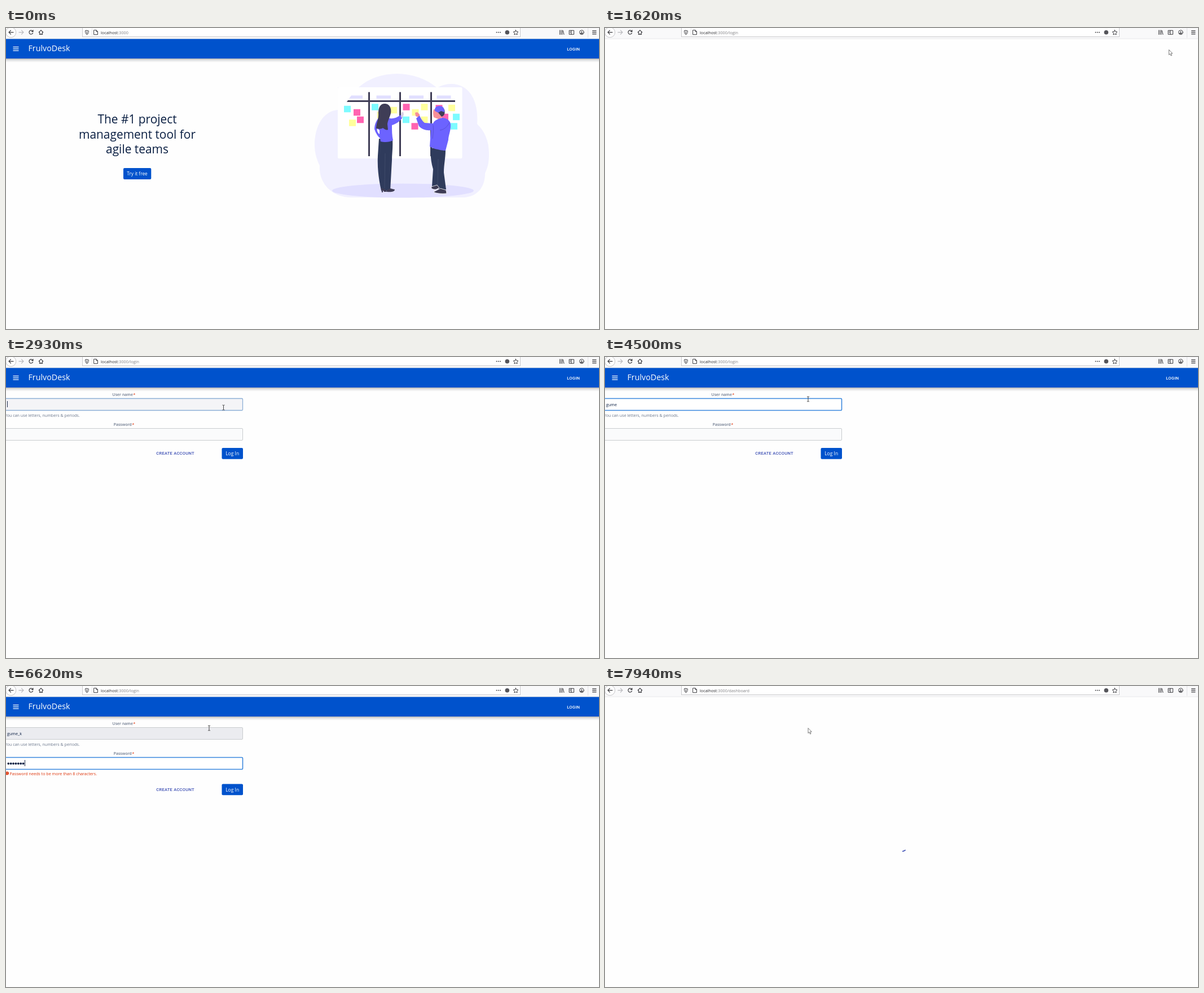
These frames come from a looping animation (1051 px wide and 533 px high, 8000 ms). An HTML page:

```html
<!DOCTYPE html>
<html lang="en">
<head>
<meta charset="utf-8">
<title>Project board login</title>
<style>
  html, body { margin: 0; width: 100%; height: 100%; overflow: hidden; background: #fefefe; }
  svg { display: block; width: 1051px; height: 533px; }
  text { font-family: "Open Sans", "Noto Sans", sans-serif; font-size: 7.17px; white-space: pre; }
  .mid { text-anchor: middle; }
  .headline text { font-size: 20.9px; fill: #091e42; }
  .caps { font-family: Roboto, sans-serif; font-weight: 500; font-size: 7.6px; letter-spacing: .22px; }
  .label { font-weight: 600; font-size: 6.95px; fill: #6b778c; }
  .label tspan { font-weight: 400; fill: #de350b; }
  .icons { fill: none; stroke: #3b3b3f; stroke-width: 1.2; stroke-linecap: round; stroke-linejoin: round; }
  .notes { stroke-width: 11.5; fill: none; }
  .dark { fill: #3f3d56; }
  .navy { fill: #2f3b5c; }
  .purple { fill: #6c63ff; }
  .pale { fill: #e1dfff; }
  .skin { fill: #f78f98; }
</style>
</head>
<body>
<svg viewBox="0 0 1051 533">
  <defs>
    <linearGradient id="shade" x2="0" y2="1">
      <stop stop-color="#000" stop-opacity=".3"/>
      <stop offset=".4" stop-color="#000" stop-opacity=".11"/>
      <stop offset="1" stop-color="#000" stop-opacity="0"/>
    </linearGradient>
  </defs>
  <rect width="1051" height="533" fill="#fefefe"/>

  <g id="home">
    <g class="mid headline">
      <text x="232.5" y="169">The #1 project</text>
      <text x="232.5" y="195.5">management tool for</text>
      <text x="232.5" y="222">agile teams</text>
    </g>
    <rect x="208" y="248" width="49.3" height="20" rx="2" fill="#0052cc"/>
    <text class="mid" x="232.5" y="261.3" fill="#fff" style="font-size:8.35px">Try it free</text>

    <path fill="#f1f0ff" d="M588 145C563 147 547 173 547 207C547 222 551 233 556 244C554 277 580 300 612 300H812C836 298 849 282 849 257C855 245 856 235 856 222C856 200 848 182 835 170C838 130 822 99 789 99C779 99 771 102 764 106C745 90 720 81 693 81C667 81 643 89 625 105H588Z"/>
    <ellipse class="pale" cx="703.5" cy="288" rx="125.5" ry="12.6"/>
    <rect x="588" y="105" width="220.5" height="126" rx="2" fill="#fff"/>
    <path class="pale" d="M612 119.5H632V125H608ZM656.5 119.5h25.5v5.5h-25.5zM714.5 119.5h25.5v5.5h-25.5zM763.5 119.5h25v5.5h-25z"/>
    <path class="dark" d="M606 128H796V131H604ZM642 113.5h3v113.5h-3zM697 113.5h3v113.5h-3zM752 113.5h3v113.5h-3z"/>
    <g class="notes">
      <path stroke="#7dfbff" d="M599 143.5h12M648 140h12M703 162.5h12M792 157.5h12M788 174h12"/>
      <path stroke="#ff63b1" d="M616 149.5h12M622 162.5h12M703.5 140h12M718.5 174h12M761.5 142h12M772 157.5h12"/>
      <path stroke="#ffff9c" d="M608 168h12M658 154h12M681 145.5h12M719.5 149.5h12M735.500 140h12M735.500 162.500h12M784 141.500h12"/>
    </g>

    <g id="woman">
      <path class="navy" d="M661 196L685 197C686 212 684 222 684 234L681 288H665C660 265 658 246 659 226Z"/>
      <path stroke="#46516f" stroke-width=".7" fill="none" d="M672 222L671 284"/>
      <path class="dark" d="M675 287L681 284L689 286C689 290 682 291 675 290ZM665 283L672 286L676 290H670L668 287V291H666Z"/>
      <path class="purple" d="M664 157C657 160 653 171 653 179C655 186 660 193 663 195L664 201C671 203 680 202 686 199C684 190 684 182 684 172C691 170 698 166 703 158L699 154C693 159 686 161 681 160Z"/>
      <path fill="#fff" d="M658 178L662 181L662 188C659 186 657 182 658 178Z"/>
      <path fill="#d9cfe6" d="M700 158L701 150L704 148L705 153L703 159Z"/>
      <path class="dark" d="M671 134C679 133 684 142 682 151C680 159 677 163 676 170L677 180C673 182 670 178 668 177C664 180 659 178 656 178C656 169 661 161 660 150C660 140 664 134 671 134Z"/>
    </g>

    <g id="man">
      <path class="navy" d="M753 212L779 217C779 230 776 242 776 256L780 286H768L763 280H755L757 250C753 237 752 225 753 212Z"/>
      <path stroke="#46516f" stroke-width=".7" fill="none" d="M766 232L765 280"/>
      <path class="dark" stroke="#fff" stroke-width=".8" d="M754 281L764 278L768 283L762 286C757 286 753 285 754 281ZM758 290L770 284L780 287L781 293C773 294 760 293 758 290Z"/>
      <path class="skin" d="M726 156L725 150L729 149L733 153L733 159ZM758 144H771L775 156L768 162L758 158Q756 149 758 144Z"/>
      <path class="purple" d="M727 160L733 155C735 160 738 165 742 168L757 169C759 164 764 161 774 159C782 160 787 164 788 170C789 181 784 190 784 198L779 217C769 217 759 214 751 210L753 181C744 182 737 179 732 174Z"/>
      <path class="dark" d="M763 147L777 144C779 152 776 156 772 157L767 151Z"/>
      <path class="purple" d="M760 147C759 141 763 138 768 138C774 138 778 142 777 149L771 147L766 150Z"/>
      <path stroke="#544dcc" stroke-width=".8" fill="none" d="M757 172C758 180 757 188 756 196M769 181C777 180 783 174 786 167"/>
    </g>
  </g>

  <g id="login">
    <g class="mid">
      <text class="label" x="209" y="69.3">User name<tspan dx=".6">*</tspan></text>
      <text class="label" x="209" y="121.5">Password<tspan dx=".6">*</tspan></text>
    </g>
    <rect id="userBox" x="-5" y="73.5" width="424.5" height="21" rx="1.5"/>
    <text id="userText" x="2" y="87" fill="#091e42"></text>
    <text x="-2" y="105.5" fill="#6b778c">You can use letters, numbers &amp; periods.</text>
    <rect id="passBox" x="-5" y="126.5" width="424.5" height="21" rx="1.5"/>
    <path id="dots" stroke="#091e42" stroke-width="3.8" stroke-linecap="round"/>
    <rect id="caret" width="1" height="11" fill="#1c2b4a"/>
    <g id="error">
      <circle cx="2" cy="154.5" r="3" fill="#de350b"/>
      <path d="M2 152.8v2M2 155.6v.7" stroke="#fff" stroke-width=".8"/>
      <text x="6.5" y="158" fill="#de350b">Password needs to be more than 8 characters.</text>
    </g>
    <g id="actions">
      <text class="caps mid" x="300" y="173.2" fill="#3f51b5">CREATE ACCOUNT</text>
      <rect x="382.5" y="161" width="37.5" height="19.8" rx="2" fill="#0052cc"/>
      <text class="mid" x="401.2" y="174.3" fill="#fff" style="font-size:8.5px">Log In</text>
    </g>
  </g>

  <g id="header">
    <rect y="54" width="1051" height="7" fill="url(#shade)"/>
    <rect y="19" width="1051" height="35" fill="#0052cc"/>
    <path d="M12.5 33.7h10M12.5 36.9h10M12.5 40.1h10" stroke="#fff" stroke-width="1.2"/>
    <text x="39.5" y="41" fill="#fff" style="font-size:14.25px">FrulvoDesk</text>
    <text class="caps mid" x="1005.7" y="39.6" fill="#fff">LOGIN</text>
  </g>

  <circle id="spinner" cx="525.5" cy="281.5" r="11.4" pathLength="360" fill="none" stroke="#3f51b5" stroke-width="1.8"/>

  <g id="browser">
    <rect width="1051" height="19" fill="#f9f9fa"/>
    <path d="M0 19h1051" stroke="#e4e4e6" stroke-width=".8"/>
    <rect x="135.5" y="-3" width="776" height="18.5" fill="#fff" stroke="#c9c9cc"/>
    <circle cx="8.7" cy="7.7" r="9" fill="#fff" stroke="#b8b8bc" stroke-width=".8"/>
    <g class="icons">
      <path d="M5 7.7h8M8.5 4.2L5 7.7l3.5 3.5"/>
      <path d="M23 7.7h8M27.5 4.2L31 7.7l-3.5 3.5" stroke="#b9b9bd"/>
      <path d="M47.2 5.6a3.4 3.4 0 1 0 .4 3.2M48 3.8v2.6h-2.6"/>
      <path d="M58.2 7.6l3.8-3.8 3.800 3.800M59.500 7.500v4h5v-4M62 11.500V9.500"/>
      <path d="M143.500 4.300l3 .9c0 3-.7 5.200-3 6.600-2.300-1.400-3-3.600-3-6.600zM143.500 6v4" stroke-width="1"/>
      <path d="M156 3.800h4l2.500 2.500v5.400H156zM160 3.800v2.500h2.500" stroke-width="1"/>
      <path d="M869.500 7.700h.1M872.700 7.700h.1M875.900 7.700h.1" stroke-width="1.800"/>
      <path d="M903.500 3.700l1.300 2.800 3 .4-2.200 2.100.5 3-2.600-1.400-2.600 1.400.5-3-2.200-2.100 3-.4z" stroke-width="1"/>
      <path d="M981.500 4v7.500M983.800 4v7.500M986 4v7.500M987 4.500l2 7" stroke-width="1"/>
      <path d="M998.500 4.300h8v7h-8zM1002 4.300v7M999.800 6.300h.8M999.800 8.300h.8" stroke-width="1"/>
      <circle cx="1020.300" cy="7.700" r="3.800" stroke-width="1"/>
      <path d="M1020.300 6.600v.1M1018.800 9.500h3" stroke-width="1.900"/>
      <path d="M1039.500 4.800h6.500M1039.500 7.700h6.500M1039.500 10.600h6.500"/>
      <path d="M152.500 1v13M1031.500 0v17" stroke="#d7d7db" stroke-width=".7"/>
    </g>
    <circle cx="888.300" cy="7.800" r="3.800" fill="#55555a"/>
    <text x="168" y="10.600" fill="#2a2a2e" style="font-size:7.250px">localhost<tspan id="path" fill="#808084"></tspan></text>
  </g>

  <g id="pointer">
    <path id="arrow" d="M0 0V9L2 7.200L3.500 10.600L5 10L3.600 6.600H6.300Z" fill="#fff" stroke="#444" stroke-width=".7"/>
    <path id="beam" d="M-2 -4.300H-.6L0 -3.800L.6 -4.300H2M0 -3.800V3.800M-2 4.300H-.6L0 3.800L.6 4.300H2" fill="none" stroke="#333" stroke-width=".9"/>
  </g>
</svg>
<script>
const LOOP = 8000;
const ENTER = 260, BLANK = 1550, FORM = 1780, FOCUS = 2860, TAB = 5270, LOADING = 7740;
const NAME = 'gume_k', MIN_PASSWORD = 8;
const DOT_PITCH = 4.38, BLINK = 460, FADE = 160;

const $ = id => document.getElementById(id);
const set = (id, attrs) => { for (const k in attrs) $(id).setAttribute(k, attrs[k]); };
const show = (id, on) => set(id, { display: on ? 'inline' : 'none' });

const ramp = (t, start, length) => Math.min(1, Math.max(0, (t - start) / length));
const smooth = k => k * k * (3 - 2 * k);
const typed = (t, first, last, total) =>
  t < first ? 0 : 1 + Math.floor(ramp(t, first, last - first) * (total - 1));

// The pointer glides from one stop to the next.
const trips = [
  { start: ENTER, end: 1050, x: 992.5, y: 54 },
  { start: 1050, end: 1600, x: 999.5, y: 38.5 },
  { start: 1690, end: 2930, x: 385.5, y: 89.5 },
  { start: 2930, end: 3450, x: 360, y: 74.5 }
];

function pointerAt(t) {
  let x = 976, y = 519;
  for (const trip of trips) {
    const k = smooth(ramp(t, trip.start, trip.end - trip.start));
    x += (trip.x - x) * k;
    y += (trip.y - y) * k;
  }
  return [x, y];
}

function paintField(id, rest, focus) {
  const mix = (a, b) => `color-mix(in srgb, ${b} ${focus * 100}%, ${a})`;
  const { style } = $(id);
  style.fill = mix(rest, '#fff');
  style.stroke = mix('#c9cccf', '#3b88dd');
  style.strokeWidth = 1 + focus * .6;
}

function drawLogin(t) {
  const letters = typed(t, 3500, 5040, NAME.length);
  const count = typed(t, 5590, 6700, MIN_PASSWORD);
  const invalid = count > 0 && count < MIN_PASSWORD;
  const inPassword = t >= TAB;
  const passFocus = ramp(t, TAB, FADE);

  paintField('userBox', t < FOCUS ? '#fafbfc' : '#ebecf0', ramp(t, FOCUS, FADE) - passFocus);
  paintField('passBox', '#fafbfc', passFocus);
  $('userText').textContent = NAME.slice(0, letters);
  const dots = Array.from({ length: count }, (_, i) => `M${4.3 + i * DOT_PITCH} 137.3h.01`);
  set('dots', { d: dots.join('') });

  const width = inPassword ? count * DOT_PITCH : letters && $('userText').getComputedTextLength();
  set('caret', { x: Math.round(2 + width), y: inPassword ? 131 : 78 });
  show('caret', t >= FOCUS && t % BLINK < BLINK / 2);
  show('error', invalid);
  set('actions', { transform: `translate(0 ${invalid ? 12.5 : 0})` });
}

function drawSpinner(age) {
  set('spinner', {
    'stroke-dasharray': `${2 + 29 * (age / 200) ** 2} 360`,
    transform: `rotate(${age * 360 / 1400} 525.5 281.5)`
  });
}

function draw(t) {
  const home = t < BLANK, loading = t >= LOADING, login = t >= FORM && !loading;
  const overField = login && t >= FOCUS;
  show('home', home);
  show('login', login);
  show('header', home || login);
  show('spinner', loading);
  $('path').textContent = ':3000' + (home ? '' : loading ? '/dashboard' : '/login');
  if (login) drawLogin(t);
  if (loading) drawSpinner(t - LOADING);
  show('arrow', t >= ENTER && !overField);
  show('beam', overField);
  set('pointer', { transform: `translate(${pointerAt(t)})` });
}

let origin;
function tick(now) {
  origin ??= now;
  draw((now - origin) % LOOP);
  requestAnimationFrame(tick);
}
draw(0);
requestAnimationFrame(tick);
</script>
</body>
</html>
```
